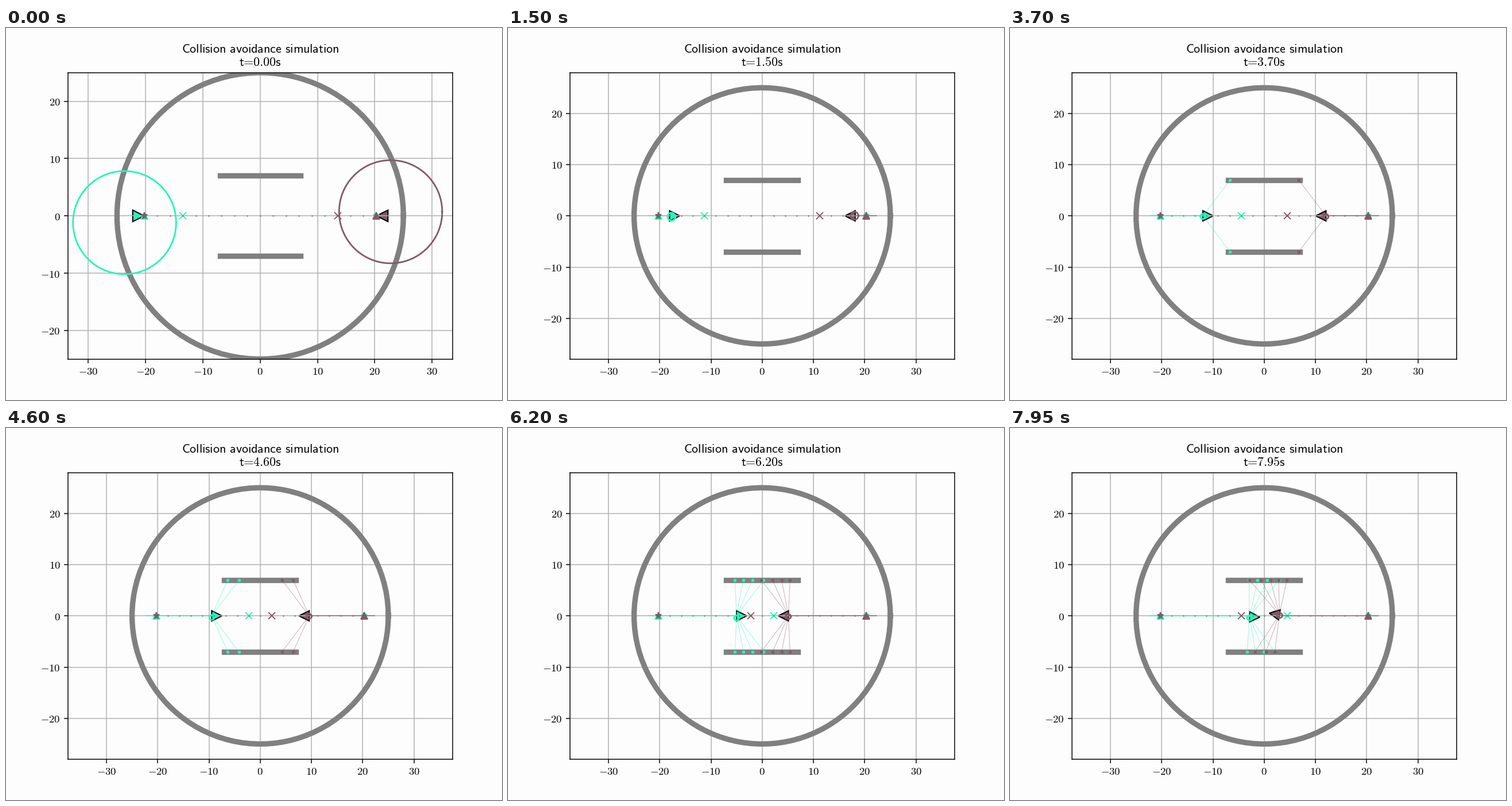
A matplotlib script for the animation above (8000 ms loop, 864x648 px).

```python
import numpy as np
import matplotlib.pyplot as plt
from matplotlib.animation import FuncAnimation
from matplotlib.ticker import MultipleLocator

plt.rcParams["mathtext.fontset"] = "cm"

DT, FRAMES = 0.05, 160
PAPER = "#fdfdfd"
TEAL, BROWN = "#24f6b9", "#835a67"
STEP, GOAL = 2.25, 20.25            # waypoint spacing, path half length
WALL = 7.0                          # walls at y = +-7, |x| <= 7
RAYS = np.radians(13.2 * np.arange(-7, 8))
REACH = 10.0
SLOW = 6.2                          # braking starts here
EST_T = [0, 0.1, 0.7, 2.3, 3.7, 5.45, 6.2, 7.95]

fig = plt.figure(figsize=(6.4, 4.8), dpi=135, facecolor=PAPER)
ax = fig.add_axes([0.125, 0.11, 0.775, 0.77], facecolor=PAPER)
for axis in (ax.xaxis, ax.yaxis):
    axis.set_major_locator(MultipleLocator(10))
    axis.set_major_formatter(lambda v, _: f"${v:.0f}$")
ax.tick_params(labelsize=9.96)
ax.tick_params(axis="x", pad=3.0)
ax.grid(True)

title = dict(size=11.7, ha="center", va="baseline")
gap = r"\hspace{0.38}"
heading = gap.join(["Collision", "avoidance", "simulation"])
fig.text(0.5125, 1 - 43.4 / 648, rf"$\mathsf{{{heading}}}$", **title)
clock = fig.text(0.5125, 1 - 66.5 / 648, "", **title)

turn = np.linspace(0, 2 * np.pi, 100)
ax.plot(25 * np.cos(turn), 25 * np.sin(turn), color="gray", lw=5)
for y in (WALL, -WALL):
    ax.plot([-WALL, WALL], [y, y], color="gray", lw=5)


class Robot:
    """A vehicle driving along y = 0; side is -1 for left start, 1 for right."""

    def __init__(self, side, color, start, speed, tilt, drift, est_dx, est_y):
        self.side, self.start, self.speed = side, start, speed
        self.tilt, self.drift = tilt, drift
        self.est_dx, self.est_y = est_dx, est_y
        way = np.arange(-GOAL, GOAL + 0.1, STEP)
        ax.plot(way, 0 * way, ls="", marker="o", ms=1.1, mew=0, color=color)
        ax.plot(side * GOAL, 0, "^", ms=6, color=color)
        ax.plot(-side * GOAL, 0, "*", ms=6, color=color)
        self.body = ax.fill([0, 1, 0], [0, 0, 1], fc=color, ec="black", lw=1.1)[0]
        self.trail, = ax.plot([], [], color=color, lw=0.8, alpha=0.8)
        self.beams, = ax.plot([], [], color=color, lw=0.6, alpha=0.4)
        self.hits, = ax.plot([], [], ".", ms=6, mew=0, color=color)
        self.target, = ax.plot([], [], "x", ms=6, color=color)
        self.ring, = ax.plot([], [], color=color, lw=1.5)

    def pose(self, t):
        late = np.maximum(t - SLOW, 0)
        gone = self.speed * (np.minimum(t, SLOW) + (1 - np.exp(-1.1 * late)) / 1.1)
        ease = (late / 1.75) ** 2
        x = self.side * (self.start - gone)
        angle = (np.pi if self.side > 0 else 0) + np.radians(self.tilt) * ease
        return x, self.drift * ease, angle

    def scan(self, x, y, angle):
        found = []
        for a in angle + RAYS:
            s = np.sin(a)
            if abs(s) < 1e-6:
                continue
            dist = (np.sign(s) * WALL - y) / s
            hit = x + dist * np.cos(a)
            if dist < REACH and abs(hit) <= WALL - 0.03:
                found.append((hit, np.sign(s) * WALL))
        return found

    def update(self, n):
        t = n * DT
        x, y, angle = self.pose(t)
        c, s = np.cos(angle), np.sin(angle)
        local = np.array([[0, 1], [2, 0], [0, -1]])
        self.body.set_xy(local @ np.array([[c, s], [-s, c]]) + [x, y])

        past = np.arange(n + 1) * DT
        px, py, _ = self.pose(past)
        self.trail.set_data(px, py)

        points = self.scan(x, y, angle)
        self.hits.set_data([p[0] for p in points], [p[1] for p in points])
        bx, by = [], []
        for hx, hy in points:
            bx += [x, hx, np.nan]
            by += [y, hy, np.nan]
        self.beams.set_data(bx, by)

        ahead = min(GOAL, abs(x)) * np.sign(x)
        near = STEP * np.round(ahead / STEP)
        self.target.set_data([near - self.side * 3 * STEP], [0])

        r = max(9 / np.sqrt(1 + 4.7 * n), 0.47)
        cx = x + np.interp(t, EST_T, self.est_dx)
        cy = np.interp(t, EST_T, self.est_y)
        self.ring.set_data(cx + r * np.cos(turn), cy + r * np.sin(turn))


robots = [
    Robot(-1, TEAL, 22.25, 2.78, -1.5, -0.2,
          [-1.43, 0.4, 0.67, 0.09, 0, 0, 0, 0],
          [-1.18, -0.4, -0.2, -0.12, -0.12, -0.48, -0.42, -0.4]),
    Robot(1, BROWN, 22.3, 2.77, -9.5, 0.2,
          [0.47, -0.2, -0.28, 0, 0, 0, 0, 0.08],
          [0.72, 0.3, 0.15, -0.1, -0.14, -0.03, -0.14, 0.08]),
]


def draw(n):
    # pixels per unit are equal on both axes
    half_x = 37.5 if n else 25 * 669.6 / 498.96
    half_y = half_x * 498.96 / 669.6
    ax.set_xlim(-half_x, half_x)
    ax.set_ylim(-half_y, half_y)
    clock.set_text(rf"$\mathsf{{t\hspace{{-0.2}}=\hspace{{-0.2}}{n * DT:.2f}s}}$")
    for robot in robots:
        robot.update(n)
    return []


anim = FuncAnimation(fig, draw, frames=FRAMES, interval=50, repeat=True,
                     repeat_delay=0, init_func=lambda: draw(0), blit=False)
plt.show()
```
